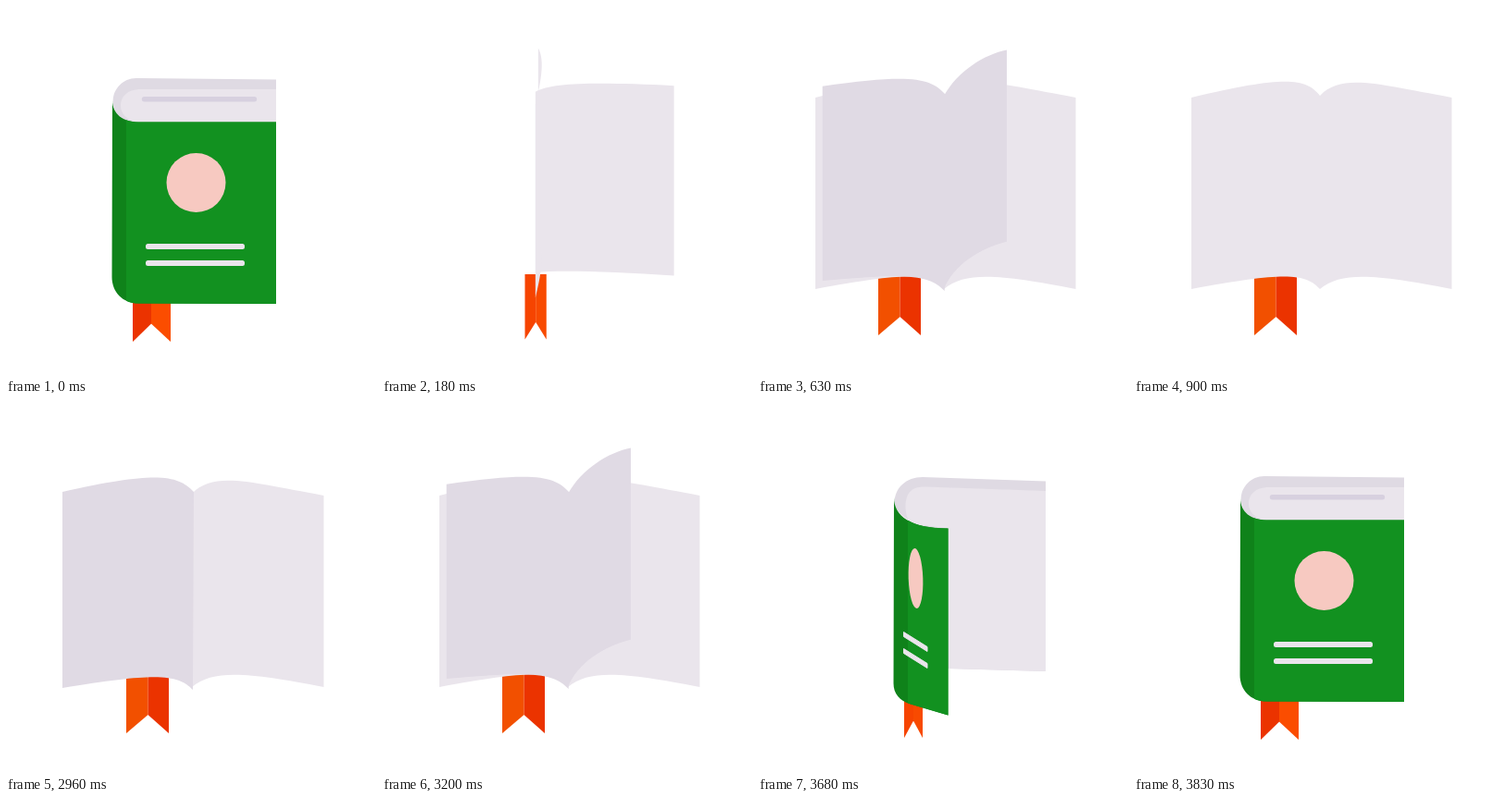
An HTML page that plays this animation: 400x400 px, repeating every 4.86 s.

```html
<!DOCTYPE html>
<html lang="en">
<head>
<meta charset="utf-8">
<title>Book</title>
<style>
  html, body { margin: 0; width: 100%; height: 100%; overflow: hidden; background: #fff; }
  svg { display: block; width: 100%; height: 100%; }
</style>
</head>
<body>
<svg id="stage" viewBox="0 0 400 400"></svg>
<script>
const stage = document.getElementById('stage');
const LOOP = 4860, STEP = 30, LAST = 30;
const PAPER = '#eae5ec', SHADE = '#e0dae4', GREEN = '#129120', SPINE = '#0f821a';

// Sheet: top edge (spine, two controls, outer corner), then bottom edge.
const RIGHT = [201, 97, 225, 72, 265, 85, 343.5, 99, 201, 306, 225, 286, 265, 291, 343.5, 306];
const RISING = [201, 97, 220, 68, 258, 57, 296, 58, 201, 306, 214, 279, 250, 268, 296, 265];
const UPRIGHT = [201, 97, 206, 76, 212, 50, 204, 36, 201, 306, 206, 285, 212, 258, 204, 244];
const FALLING = [201, 97, 190, 79, 174, 73, 103, 64, 201, 306, 190, 289, 174, 281, 103, 270];
const LEFT = [201, 97, 186, 78, 163, 75, 62, 99, 201, 306, 186, 289, 163, 287, 62, 306];
const LANDED = [203, 95, 186, 77, 163, 72, 61, 95, 202, 309, 186, 292, 163, 290, 61, 307];
const AJAR = [160, 92, 178, 84, 230, 82, 311, 84, 160, 285, 190, 285, 250, 287, 311, 289];

const FLIP = 12, STARTS = [4, 10, 17];

const clamp = v => Math.max(0, Math.min(1, v));
const mix = (a, b, k) => a + (b - a) * k;
const path = (d, fill, extra = '') => `<path d="${d}" fill="${fill}" ${extra}/>`;

function spline(a, b, c, d, k) {
  return b + k / 2 * (c - a + k * (2 * a - 5 * b + 4 * c - d + k * (3 * (b - c) + d - a)));
}

// Pose of a turning sheet: u = 0 lies right, u = 1 lies left.
function turn(u, end) {
  const poses = [RIGHT, RISING, UPRIGHT, FALLING, end];
  const i = Math.min(3, Math.floor(u * 4)), k = u * 4 - i;
  const at = n => poses[Math.max(0, Math.min(4, n))];
  return RIGHT.map((_, j) => spline(at(i - 1)[j], at(i)[j], at(i + 1)[j], at(i + 2)[j], k));
}

function sheet(p, fill, dx = 0, dy = 0) {
  const q = p.map((v, i) => (v + (i % 2 ? dy : dx)).toFixed(2));
  const pt = i => q[2 * i] + ' ' + q[2 * i + 1];
  return path(`M${pt(0)}C${pt(1)} ${pt(2)} ${pt(3)}L${pt(7)}C${pt(6)} ${pt(5)} ${pt(4)}Z`, fill);
}

function ribbon(s) {
  const e = clamp(s / 5), f = clamp((s - 5) / 8);
  const at = (a, b, c) => mix(mix(a, b, e), c, f);
  const l = at(137, 158, 130), m = at(157, 168, 153.5), r = at(178, 178, 176);
  const low = at(363, 361, 356), notch = at(343.5, 342.5, 336);
  const [c1, c2] = s < 4 ? ['#eb3300', '#fb4d00'] : s < 8 ? ['#f64400', '#f84a00'] : ['#f25000', '#eb3300'];
  return path(`M${l} 290H${m}V${notch}L${l} ${low}Z`, c1) +
         path(`M${m} 290H${r}V${low}L${m} ${notch}Z`, c2);
}

function closedBook(s) {
  const e = s / 5, rad = Math.PI / 12;
  const q = (1 - Math.cos(s * rad)) / (1 - Math.cos(5 * rad));
  const m = (a, b) => mix(a, b, q);
  const x = mix(115, 147, e), right = mix(292, 311, e), edge = m(292, 205.5);
  const lip = m(125.5, 134.5), foot = `V286L${right} 289Z`;

  const block = `M${right} ${m(79.5, 83.5)}L${m(141, 178)} ${m(78, 79)}` +
    `C${m(126, 160)} ${m(78, 79)} ${x + .7} ${m(90, 91)} ${x + .7} ${m(103, 106)}` +
    `C${x + .7} 118 ${m(127, 165)} ${lip} ${m(143, 205)} ${lip}H${edge}` + foot;
  const inner = `M${right} ${m(90, 94)}L${m(146, 180)} ${m(90, 89.5)}` +
    `C${m(130, 164)} ${m(90, 89.5)} ${m(124, 160)} ${m(99, 98)} ${m(124, 159.5)} ${m(108, 110)}` +
    `C${m(124, 159.5)} ${m(116, 118)} ${m(130, 161)} ${m(123, 122)} ${m(140, 164)} ${m(125, 129)}` +
    `L${edge} ${lip}` + foot;
  const cover = `M${x} ${m(102, 101)}C${x} ${m(117, 121)} ${m(127, 165)} ${lip} ${m(143, 205)} ${lip}` +
    `H${edge}V${m(322, 336.5)}L${m(143, 165)} ${m(321.5, 324.5)}` +
    `C${m(126, 153)} ${m(321.5, 321)} ${x - .5} ${m(309, 313)} ${x - .5} ${m(293, 302)}Z`;

  const rule = dy => {
    const w = m(5, 1), h = (6 - w) / 2, x1 = m(153.5, 157.5), x2 = m(255.5, 183);
    const y1 = m(260, 249) + dy, y2 = m(260, 265) + dy;
    return path(`M${x1} ${y1 - h}L${x2} ${y2 - h}V${y2 + h}L${x1} ${y1 + h}Z`, PAPER,
      `stroke="${PAPER}" stroke-width="${w}" stroke-linejoin="round"`);
  };
  const cx = m(205.5, 170.5), cy = m(191, 188.5);
  const bar = s < 3 ? path(`M${m(149.5, 178)} 100.7H${m(268.5, 250)}`, 'none',
    'stroke="#d7d0df" stroke-width="5.4" stroke-linecap="round"') : '';

  return path(block, '#dfdae3') + path(inner, PAPER) + bar +
    path(cover, SPINE) +
    `<clipPath id="front"><rect x="${m(130, 162)}" y="0" width="300" height="400"/></clipPath>` +
    path(cover, GREEN, 'clip-path="url(#front)"') +
    `<ellipse cx="${cx}" cy="${cy}" rx="${m(32, 7.8)}" ry="${m(32, 32.5)}" fill="#f7c9c1" transform="rotate(${m(0, -2)} ${cx} ${cy})"/>` +
    rule(0) + rule(18);
}

function openBook(s) {
  const e = clamp((s - 5) / 7);
  const base = AJAR.map((v, i) => mix(v, RIGHT[i], e));
  const dx = base[0] - 201, dy = base[1] - 97 + 16 * (1 - e);
  let out = sheet(base, PAPER) + sheet(turn(clamp(s / FLIP), LEFT), PAPER, dx, dy);
  // Later sheets lie under earlier ones until they cross to the left.
  for (const start of STARTS) {
    const u = (s - start) / FLIP;
    if (s >= 8 && u > 0 && u <= 1) out += sheet(turn(u, LANDED), SHADE, dx, dy);
  }
  return out;
}

function stateAt(t) {
  if (t < 900) return Math.floor(t / STEP);
  if (t < 2960) return LAST;
  return Math.max(0, LAST - 1 - Math.floor((t - 2960) / STEP));
}

let shown = -1;
function draw(t) {
  const s = stateAt(t % LOOP);
  if (s === shown) return;
  shown = s;
  stage.innerHTML = ribbon(s) + (s < 6 ? closedBook(s) : openBook(s));
}

const began = performance.now();
function tick() {
  draw(performance.now() - began);
  requestAnimationFrame(tick);
}
tick();
</script>
</body>
</html>
```
